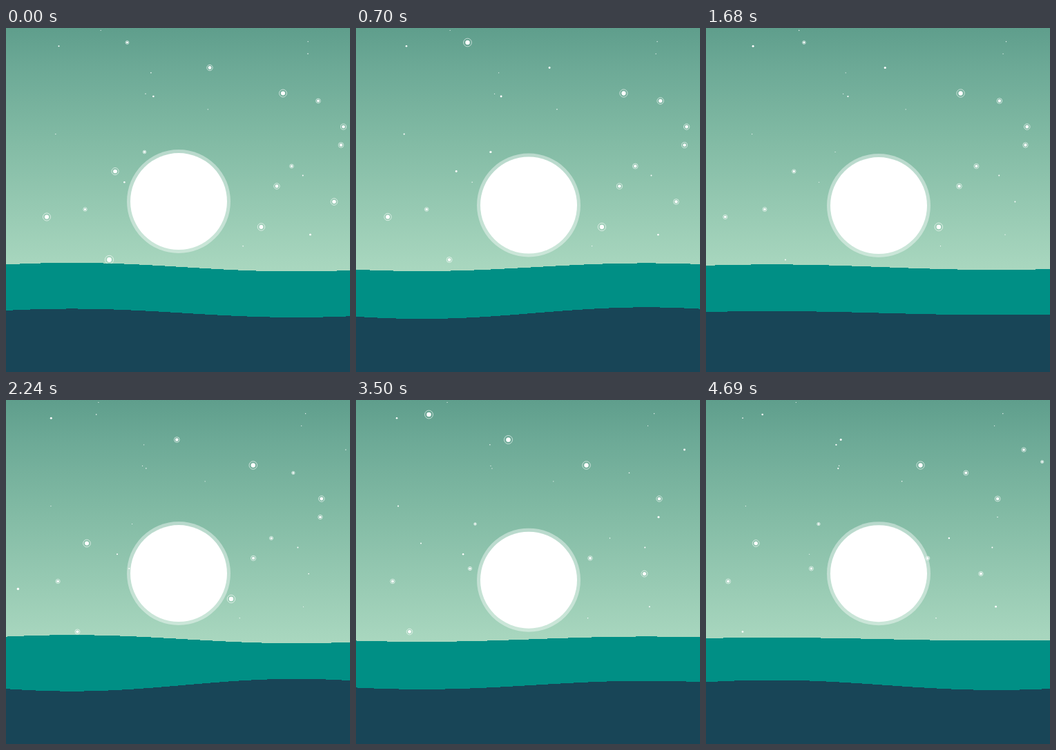
Write an HTML page with a canvas that moves like this. It is 498 by 498 pixels and loops after 4760 ms.

```html
<!DOCTYPE html>
<html lang="en">
<head>
<meta charset="utf-8">
<title>Moon over the sea</title>
<style>
  html, body { margin: 0; width: 100%; height: 100%; overflow: hidden; background: #184557; }
  canvas { display: block; }
</style>
</head>
<body>
<canvas width="498" height="498"></canvas>
<script>
const SIZE = 498, STEP = 70, STEPS = 68, HORIZON = 346, TAU = Math.PI * 2;
const ctx = document.querySelector('canvas').getContext('2d');

const sky = ctx.createLinearGradient(0, 0, 0, 350);
sky.addColorStop(0, '#5f9e8c');
sky.addColorStop(0.16, '#6ca996');
sky.addColorStop(0.44, '#80b9a3');
sky.addColorStop(1, '#a9d7bf');

let seed = 7;
function random(min, max) {
  seed = (seed * 16807) % 2147483647;
  return min + (max - min) * seed / 2147483647;
}

// Nearer stars drift faster and shine larger.
function star(x, y, drift) {
  return { x, y, drift, phase: random(0.2, 0.5), rate: random(-0.03, 0.03) };
}

const brightStars = [
  star(175.5, 21, 1.4), star(295, 57.5, 1.49), star(401, 94.5, 1.35),
  star(452, 105.5, 1.13), star(488.5, 143, 0.99), star(485, 169.5, 0.94),
  star(200.5, 179.5, 0.56), star(413.5, 200, 0.92), star(158, 207.5, 1.28),
  star(392, 229, 1.06), star(475, 251.5, 1.15), star(114.5, 262.5, 1.23),
  star(59, 273.5, 1.3), star(369.5, 288, 1.36), star(149.5, 335.5, 1.44),
  star(521, 72, 0.91), star(557, 89.5, 1.05), star(202, 244, 0.74)
];
const faintStars = Array.from({ length: 14 }, () =>
  star(random(0, SIZE), random(0, HORIZON - 10), random(0.02, 0.35)));
const stars = [...brightStars, ...faintStars];

const wave = (step, period, peak) => Math.cos(TAU * (step - peak) / period);

function disc(x, y, r, color) {
  ctx.fillStyle = color;
  ctx.beginPath();
  ctx.arc(x, y, r, 0, TAU);
  ctx.fill();
}

function twinkle({ x, y, drift, phase, rate }, step) {
  const glow = 0.55 - 0.45 * Math.cos(TAU * (phase + rate * step));
  const r = 0.4 + 4.3 * drift * glow;
  const cx = x - drift * step;
  if (r < 2.2) return disc(cx, y, Math.max(0.6, r * 0.8), '#fff');
  disc(cx, y, r * 0.52, '#fff');
  ctx.strokeStyle = 'rgba(255,255,255,.6)';
  ctx.beginPath();
  ctx.arc(cx, y, r - 0.4, 0, TAU);
  ctx.stroke();
}

// Hard-edged swell, one pixel column at a time.
function sea(level, swing, color) {
  ctx.fillStyle = color;
  for (let x = 0; x < SIZE; x++) {
    const top = Math.round(level - swing * Math.cos(Math.PI * (x - 95) / 325));
    ctx.fillRect(x, top, 1, SIZE - top);
  }
}

function draw(step) {
  ctx.fillStyle = sky;
  ctx.fillRect(0, 0, SIZE, SIZE);

  const moonY = 255.8 - 4.9 * wave(step, 32, 1.3);
  disc(250, moonY, 75, 'rgba(255,255,255,.42)');
  disc(250, moonY, 70, '#fff');

  stars.forEach(s => twinkle(s, step));

  sea(HORIZON + 0.2, 7.2 * wave(step, 31.6, -2.55), '#008f85');
  sea(412.7, 9.6 * wave(step, 22.5, 41.9), '#184557');
}

const start = performance.now();
function frame() {
  draw(Math.floor((performance.now() - start) / STEP) % STEPS);
  requestAnimationFrame(frame);
}
frame();
</script>
</body>
</html>
```
